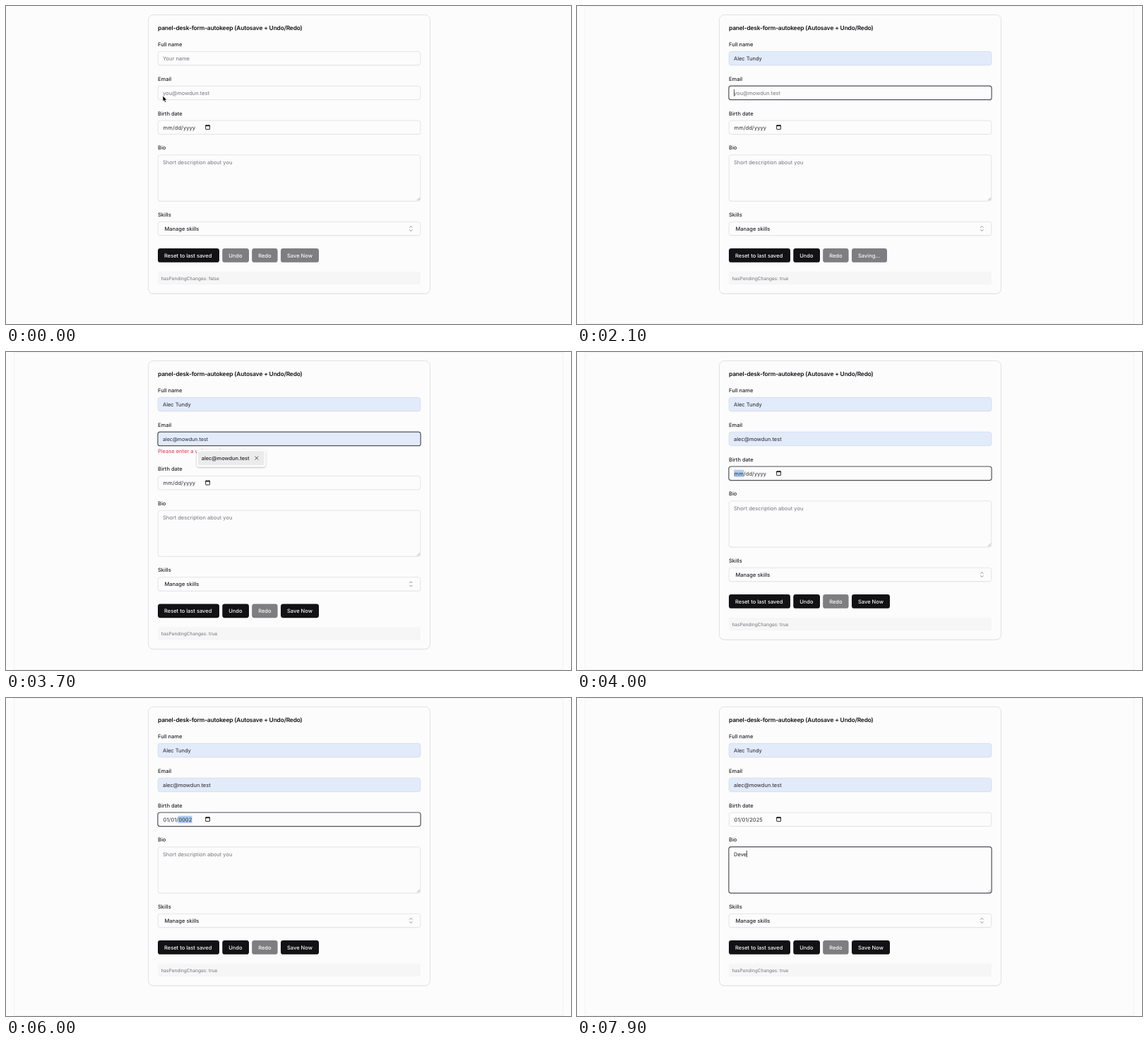
An HTML page that plays this animation: 800 by 450 pixels, repeating every 8000 ms.

```html
<!DOCTYPE html>
<html lang="en">
<head>
<meta charset="utf-8">
<title>Autosave form</title>
<style>
  html, body { margin: 0; width: 100%; height: 100%; overflow: hidden; background: #fcfcfd; }
  svg { display: block; width: 800px; height: 450px; }
  text { font-family: Inter, "Open Sans", sans-serif; text-rendering: geometricPrecision; white-space: pre; }
</style>
</head>
<body>
<svg id="stage" viewBox="0 0 800 450" xmlns="http://www.w3.org/2000/svg"></svg>
<script>
const LOOP = 8000, STEP = 100;
const INK = '#242428', DARK = '#121215', MUTED = '#77777d', LINE = '#e2e2e5';
const PAPER = '#fcfcfd', FILLED = '#e2ebfa', ERROR = '#d93d48';
const LEFT = 215, RIGHT = 587, TEXT_X = 222;
const NAME = 'Alec Tundy', MAIL = 'alec@mowdun.test', MAIL_HINT = 'you@mowdun.test';

const stage = document.getElementById('stage');
const pen = document.createElement('canvas').getContext('2d');

// Text width at the regular field size
function measure(s, size = 7.5) {
  pen.font = '100px Inter, "Open Sans", sans-serif';
  return pen.measureText(s).width * size / 100;
}

const within = (t, a, b) => t >= a && t < b;

// Last value whose start time has passed; steps are [time, value]
const latest = (t, steps) => steps.reduce((v, [at, next]) => t >= at ? next : v, '');

// Caret blinks half a second on, half a second off
const blinks = (t, from) => (t - from) % 1000 < 500;

function rect(x, y, w, h, r, fill, extra = '') {
  return `<rect x="${x}" y="${y}" width="${w}" height="${h}" rx="${r}" fill="${fill}" ${extra}/>`;
}

function path(d, stroke, width = 1, extra = '') {
  return `<path d="${d}" fill="none" stroke="${stroke}" stroke-width="${width}" ${extra}/>`;
}

function text(x, y, s, { size = 7.5, weight = 400, fill = INK, gap = 0 } = {}) {
  return `<text x="${x}" y="${y}" font-size="${size}" font-weight="${weight}" fill="${fill}" letter-spacing="${gap}">${s}</text>`;
}

const label = (y, s) => text(LEFT, y, s, { weight: 500 });
const caret = (x, y) => path(`M${x} ${y - 8}V${y + 1.5}`, DARK, 0.7);

function field(y, h, focused, filled) {
  const w = RIGHT - LEFT;
  const fill = filled ? FILLED : PAPER;
  if (focused) {
    return rect(LEFT - 0.1, y - 0.1, w + 0.2, h + 0.2, 3.3, fill, 'stroke="#505057" stroke-width="1.2"');
  }
  return rect(LEFT, y + 0.7, w, h, 3.3, '#f1f1f3') +
    rect(LEFT + 0.2, y, w - 0.4, h, 3.3, fill, `stroke="${filled ? '#d6dde9' : LINE}" stroke-width="0.9"`);
}

function button(x, w, s, enabled) {
  return rect(x, 343, w, 19.8, 3.4, enabled ? DARK : '#7e7e81') +
    text(x + 9, 355.6, s, { weight: 500, fill: '#fafafa' });
}

function popup(y, w, s, hover) {
  return `<g filter="url(#lift)">${rect(270, y, w, 24.5, 3.5, '#fdfdfd')}</g>` +
    (hover ? rect(272, y + 2.3, w - 4, 20, 2, '#ebebec') : '') +
    text(276.7, y + 15, s, { weight: 500, size: 7.4 }) +
    path(`M${w + 254.8} ${y + 9.6}l5 5m0 -5l-5 5`, '#4c4c50', 0.9);
}

function nameField(t) {
  const preview = within(t, 700, 900), done = t >= 900;
  const focused = within(t, 500, 1300);
  let out = label(56.7, 'Full name') + field(64.3, 19.4, focused, preview || done);
  if (done) out += text(TEXT_X, 77, NAME);
  else if (preview) out += text(TEXT_X, 77, NAME, { size: 6.95 });
  else out += text(TEXT_X, 77, 'Your name', { fill: MUTED });
  if (focused && blinks(t, 500)) {
    out += caret(TEXT_X + 0.5 + (done ? measure(NAME) : 0), 77);
  }
  return out;
}

function mailField(t) {
  const preview = within(t, 3600, 3900), done = t >= 3900;
  const focused = within(t, 1400, 4000);
  const typed = latest(t, [[2700, 'a'], [2900, 'al']]);
  let out = label(105.6, 'Email') + field(113.2, 19.4, focused, preview || done);
  if (done) out += text(TEXT_X, 126, MAIL);
  else if (preview) out += text(TEXT_X, 126, MAIL, { size: 7.1 });
  else if (typed) out += text(TEXT_X, 126, typed);
  else out += text(TEXT_X, 126, MAIL_HINT, { fill: MUTED });

  const idle = t < 2500 ? !within(t, 1700, 2000) : blinks(t, 2900) || t < 2900;
  if (focused && !preview && !done && idle) {
    out += caret(TEXT_X + 0.5 + measure(typed), 126);
  }
  if (within(t, 2700, 3900)) {
    out += text(LEFT, 143.4, 'Please enter a valid email', { fill: ERROR });
  }
  return out;
}

function dateField(t) {
  const focused = within(t, 4000, 6700);
  const parts = [
    latest(t, [[0, 'mm'], [5600, '00'], [5700, '01']]),
    latest(t, [[0, 'dd'], [5800, '00'], [5900, '01']]),
    latest(t, [[0, 'yyyy'], [6000, '0002'], [6100, '0020'], [6200, '0202'], [6300, '2025']])
  ];
  let out = label(154.5, 'Birth date') + field(162.1, 19.4, focused, false);
  if (focused) {
    const active = t < 5700 ? 0 : t < 5900 ? 1 : 2;
    const before = parts.slice(0, active).map(p => p + '/').join('');
    out += rect(TEXT_X + 0.2 + measure(before, 7.65), 166.7, measure(parts[active], 7.65) + 0.8, 10.4, 0.8, '#accdf5');
  }
  out += text(TEXT_X + 0.6, 174.6, parts.join('/'), { gap: 0.1, fill: '#2f2f34' });

  if (within(t, 6700, 7000)) {
    out += rect(280.8, 167, 9.6, 9.8, 1, '#d8e3f5', 'stroke="#2b4778" stroke-width="1.2"');
  }
  out += rect(282.7, 169, 5.8, 5.6, 0.6, PAPER, `stroke="${DARK}" stroke-width="0.9"`) +
    path('M282.3 169.4h6.6', DARK, 1.5) + path('M284 168v1m3.2 -1v1', DARK, 0.8);
  return out;
}

function bioField(t) {
  const focused = t >= 7000;
  const typed = latest(t, [[7300, 'D'], [7500, 'De'], [7700, 'Dev'], [7800, 'Deve']]);
  let out = label(203.4, 'Bio') + field(210.8, 65.2, focused, false);
  out += typed ? text(TEXT_X, 223.9, typed)
    : text(TEXT_X, 223.9, 'Short description about you', { fill: MUTED });
  if (focused) out += caret(TEXT_X + 0.4 + measure(typed), 223.9);
  return out + path('M581.8 275l4.2 -4.2M584 275l2 -2', '#8b8b90', 0.6);
}

function controls(t) {
  const saving = within(t, 1900, 2500) || within(t, 5000, 5300) || within(t, 7300, 7700);
  const pending = within(t, 900, 2500) || within(t, 2700, 5300) || t >= 6000;
  return label(297.8, 'Skills') + field(305.3, 19.4, false, false) +
    text(224.5, 317.7, 'Manage skills', { weight: 500 }) +
    path('M571.3 313.6l2 -2.1l2 2.1M571.3 316.4l2 2.1l2 -2.1', '#717176', 0.8) +
    button(215, 87, 'Reset to last saved', true) +
    button(306.3, 37.7, 'Undo', t >= 900) +
    button(348.2, 36.4, 'Redo', false) +
    button(389, saving ? 50 : 54, saving ? 'Saving...' : 'Save Now', pending && !saving) +
    rect(LEFT, 376, RIGHT - LEFT, 18, 1, '#f6f6f7') +
    text(219.5, 387.5, `hasPendingChanges: ${pending}`, { size: 6.55, fill: '#74747b' });
}

function pointer(t) {
  if (t >= 1300) return '';
  let x, y;
  if (t < 500) {
    const k = Math.min(t / 300, 1);
    x = 222 + 22 * k * k;
    y = 127 - 48 * k;
  } else {
    const k = Math.min((t - 500) / 300, 1);
    x = 244 + 32.7 * k;
    y = 79 + 25 * k;
  }
  if (y < 84) {
    return path(`M${x - 2} ${y - 4.5}q2 0 2 1.3v6.4q0 1.3 -2 1.3M${x + 2} ${y - 4.5}q-2 0 -2 1.3v6.4q0 1.3 2 1.3`, DARK, 0.8);
  }
  return `<path transform="translate(${x} ${y})" d="M0 0V8.2L1.9 6.5L3.1 9.4L4.6 8.8L3.4 6H5.9Z" fill="#000" stroke="#fff" stroke-width="0.7"/>`;
}

function draw(t) {
  const shift = within(t, 2700, 3900) ? 13.4 : 0;
  let out = `<defs><filter id="lift" x="-20%" y="-40%" width="140%" height="190%">
    <feDropShadow dx="0" dy="0.8" stdDeviation="1.2" flood-color="#000" flood-opacity="0.32"/></filter></defs>`;
  out += rect(0, 0, 800, 450, 0, PAPER);
  if (t >= 500) out += rect(11.5, 0.5, 777, 449, 0, 'none', 'stroke="#f2f2f4"');
  out += rect(201.5, 13.5, 399, 394.5 + shift, 7, '#f0f0f2') +
    rect(201.5, 12.5, 399, 394.5 + shift, 7, PAPER, `stroke="${LINE}"`);
  out += text(LEFT, 33.8, 'panel-desk-form-autokeep (Autosave + Undo/Redo)',
    { size: 8.4, weight: 600, gap: -0.15, fill: DARK });
  out += nameField(t) + mailField(t);
  out += `<g transform="translate(0 ${shift})">${dateField(t)}${bioField(t)}${controls(t)}</g>`;
  if (within(t, 500, 900)) out += popup(89, 87, NAME, t >= 700);
  if (within(t, 2800, 3900)) out += popup(138, 97.5, MAIL, t >= 3600);
  stage.innerHTML = out + pointer(t);
}

const start = performance.now();
let shown = -1;
function tick() {
  const t = Math.floor((performance.now() - start) % LOOP / STEP) * STEP;
  if (t !== shown) draw(shown = t);
  requestAnimationFrame(tick);
}
tick();
</script>
</body>
</html>
```
